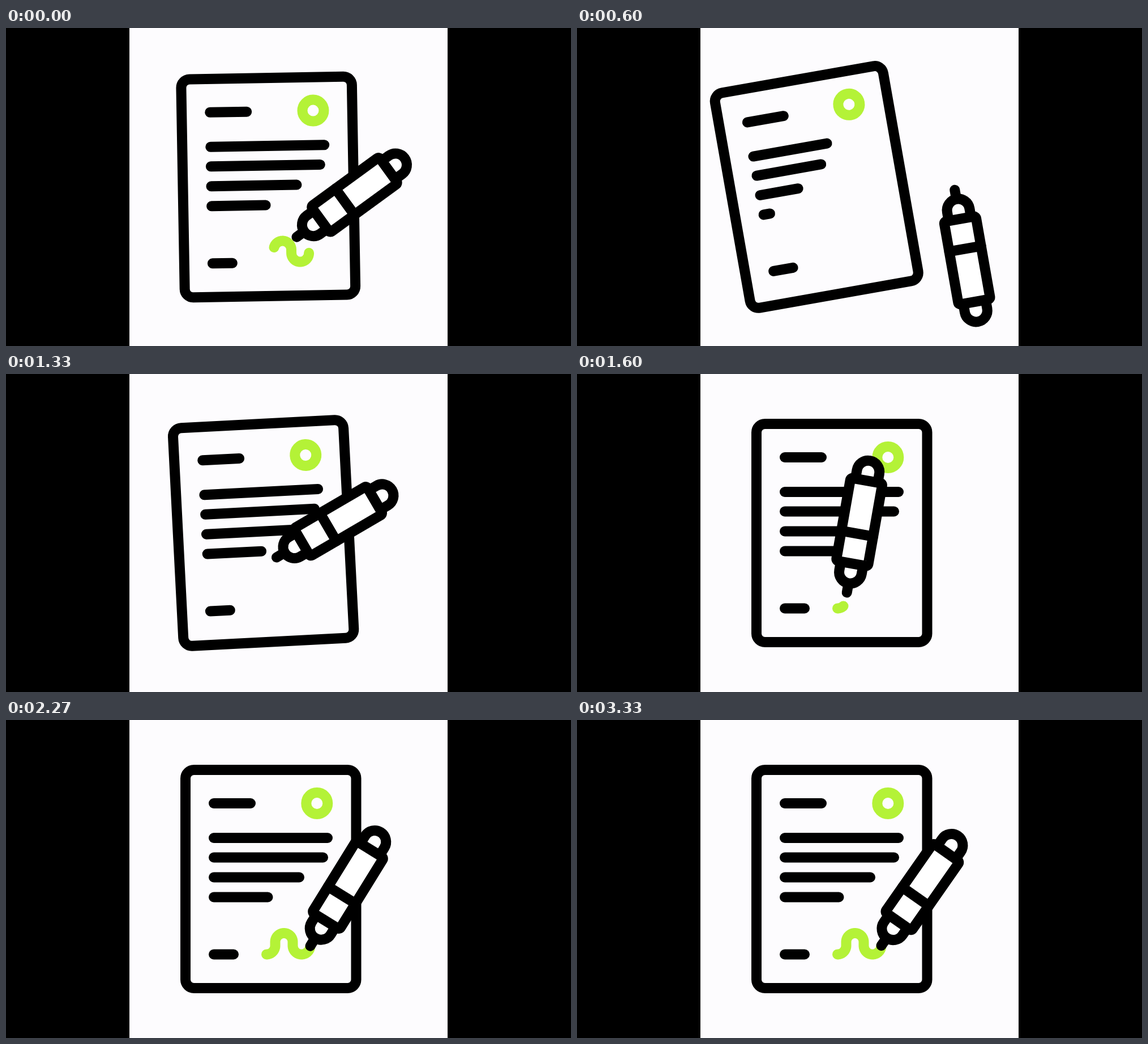
An HTML page with a canvas for the animation above (3.39 s loop, 998x561 px).

```html
<!DOCTYPE html>
<html lang="en">
<head>
<meta charset="utf-8">
<title>Signing a document</title>
<style>
  html, body { margin: 0; width: 100%; height: 100%; overflow: hidden; background: #000; }
  canvas { display: block; width: 100vw; height: 100vh; }
</style>
</head>
<body>
<canvas id="stage" width="998" height="561"></canvas>
<script>
const ctx = document.getElementById('stage').getContext('2d');
const LOOP = 3390, STEP = 1000 / 15;
const INK = '#000', LIME = '#b4f237', PAPER = '#fdfcfe';
const RAD = Math.PI / 180;

const mix = (a, b, p) => a + (b - a) * p;
const ease = (t, from, to) => {
  const u = Math.min(1, Math.max(0, (t - from) / (to - from)));
  return u * u * (3 - 2 * u);
};
const quad = (a, b, c, p) => mix(mix(a, b, p), mix(b, c, p), p);
const quadPoint = (a, b, c, p) => [quad(a[0], b[0], c[0], p), quad(a[1], b[1], c[1], p)];

// Signature: quarter arc, short rise, half arc, short fall, half arc
const R = 15.5, RISE = 6.5, QUARTER = R * Math.PI / 2;
const SIGN_LENGTH = QUARTER * 5 + RISE * 2;

function signPoint(d) {
  const arc = (cx, cy, a) => [cx + R * Math.cos(a), cy + R * Math.sin(a)];
  if (d < QUARTER) return arc(460, 398, Math.PI / 2 - d / R);
  d -= QUARTER;
  if (d < RISE) return [475.5, 398 - d];
  d -= RISE;
  if (d < 2 * QUARTER) return arc(491, 391.5, Math.PI + d / R);
  d -= 2 * QUARTER;
  if (d < RISE) return [506.5, 391.5 + d];
  return arc(522, 398, Math.PI - (d - RISE) / R);
}

function line(x1, y1, x2, y2) {
  ctx.beginPath();
  ctx.moveTo(x1, y1);
  ctx.lineTo(x2, y2);
  ctx.stroke();
}

function drawSign(from, to) {
  if (to - from < 0.5) return;
  ctx.beginPath();
  for (let d = from; d < to; d++) ctx.lineTo(...signPoint(d));
  ctx.lineTo(...signPoint(to));
  ctx.stroke();
}

// Right ends and heights of the text lines, top to bottom
const TEXT = [[568, 208], [560, 242.5], [518, 277.5], [462.5, 312.5]];

function drawDocument(t) {
  const tilt = ease(t, -127, 520) - ease(t, 857, 1600);
  ctx.save();
  ctx.translate(467.5 - 44.5 * tilt, 280.5);
  ctx.rotate(-10 * RAD * tilt);
  ctx.translate(-467.5, -280.5);

  ctx.strokeStyle = INK;
  ctx.beginPath();
  ctx.roundRect(317, 88, 301.5, 385, 15);
  ctx.stroke();
  line(367, 147, 432, 147);
  line(367, 413.5, 402, 413.5);
  TEXT.forEach(([end, y], i) => {
    const lag = 50 * (3 - i);
    const cut = ease(t, 85 + lag, 585 + lag) - ease(t, 630 + lag, 1130 + lag);
    line(367, y, end - 84 * cut, y);
  });

  ctx.strokeStyle = LIME;
  ctx.beginPath();
  ctx.arc(549.3, 147, 19, 0, 2 * Math.PI);
  ctx.stroke();
  if (t < 1000) drawSign(SIGN_LENGTH * ease(t, -130, 258), SIGN_LENGTH);
  else drawSign(0, SIGN_LENGTH * ease(t, 1440, 2330));
  ctx.restore();
}

// Pen pose: tip position and lean, 0 being upright with the tip down
const MIDDLE = 108;
const REST = [599, 308], ASIDE = [686, 392], LANDING = [494, 279];

function penPose(t) {
  if (t >= 1600) {
    const [x, y] = signPoint(mix(37, SIGN_LENGTH, ease(t, 1600, 2300)));
    return { x, y, lean: mix(10, 35, ease(t, 1600, 2460)) };
  }
  const out = ease(t, -160, 520), back = ease(t, 881, 1600);
  const [mx, my] = back > 0
    ? quadPoint(ASIDE, [631, 230], LANDING, back)
    : quadPoint(REST, [599, 289], ASIDE, out);
  const lean = back > 0 ? mix(170, 10, back) : mix(35, 170, out);
  return {
    x: mx - MIDDLE * Math.sin(lean * RAD),
    y: my + MIDDLE * Math.cos(lean * RAD),
    lean
  };
}

function shape(build) {
  ctx.beginPath();
  build();
  ctx.fill();
  ctx.stroke();
}

function drawPen(t) {
  const { x, y, lean } = penPose(t);
  ctx.save();
  ctx.translate(x, y);
  ctx.rotate(lean * RAD);
  ctx.strokeStyle = INK;
  ctx.fillStyle = '#fff';
  line(0, 0, 0, -16);
  shape(() => {
    ctx.moveTo(20, -52);
    ctx.arc(0, -36.5, 20, 0, Math.PI);
    ctx.lineTo(-20, -52);
  });
  shape(() => {
    ctx.moveTo(-20, -200.5);
    ctx.arc(0, -216, 20, Math.PI, 2 * Math.PI);
    ctx.lineTo(20, -200.5);
  });
  shape(() => ctx.roundRect(-28.5, -200.5, 57, 148.5, 4));
  line(-28.5, -105.5, 28.5, -105.5);
  ctx.restore();
}

function draw(t) {
  ctx.fillStyle = INK;
  ctx.fillRect(0, 0, 998, 561);
  ctx.fillStyle = PAPER;
  ctx.fillRect(218, 0, 562, 561);
  ctx.lineWidth = 18;
  ctx.lineCap = ctx.lineJoin = 'round';
  drawDocument(t);
  drawPen(t);
}

// The motion runs at 15 steps a second
const start = performance.now();
function tick() {
  const t = (performance.now() - start) % LOOP;
  draw(Math.floor((t + 3.5) / STEP) * STEP);
  requestAnimationFrame(tick);
}
tick();
</script>
</body>
</html>
```
